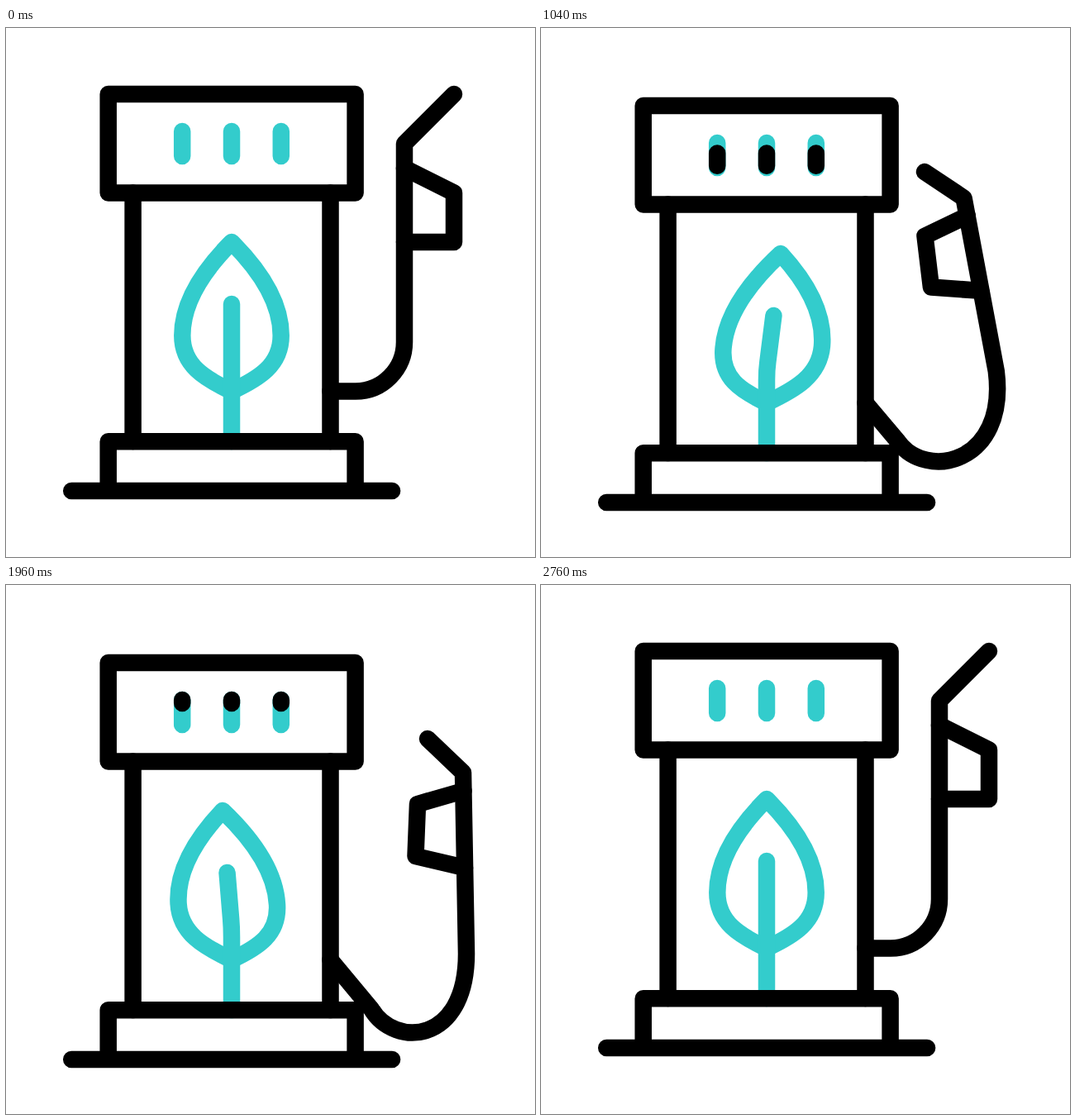
These frames come from a looping animation (640x640 px, 3 s). An HTML page:

```html
<!DOCTYPE html>
<html lang="en">
<head>
<meta charset="utf-8">
<title>Green fuel pump</title>
<style>
  html, body { margin: 0; width: 100%; height: 100%; overflow: hidden; background: #fff; }
  svg { display: block; width: 100vw; height: 100vh; }
  path { fill: none; stroke-width: 20.5; stroke-linecap: round; stroke-linejoin: round; }
  .teal { stroke: #33cccc; }
  .black { stroke: #000; }
</style>
</head>
<body>
<svg viewBox="0 0 640 640">
  <g id="pump">
    <path id="leaf" class="teal"/>
    <path id="stem" class="teal"/>
    <path id="slots" class="teal"/>
    <path id="lamps" class="black"/>
    <path class="black" d="M123.7 79.9H422.6V199.5H123.7Z"/>
    <path class="black" d="M153.6 199.5V500M392.5 199.5V500"/>
    <path class="black" d="M123.7 560V500.2H422.6V560M79.2 560H467.1"/>
    <path id="hose" class="black"/>
    <path id="grip" class="black"/>
  </g>
</svg>
<script>
const LOOP = 3000, STEP = 40;
const MID = 273, SLOT_GAP = 59.8, SLOT_END = 155, SLOT_LEN = 30;

const fix = v => v.toFixed(2);
const mix = (a, b, u) => a + (b - a) * u;
const setPath = (id, d) => document.getElementById(id).setAttribute("d", d);

// Smooth 0..1 ramp between two times
function ramp(t, from, to) {
  const u = Math.min(1, Math.max(0, (t - from) / (to - from)));
  return u * u * (3 - 2 * u);
}

// The pump sinks, settles a little higher, then rises again
const drop = t =>
  16.5 * ramp(t, 120, 600) - 2.5 * ramp(t, 600, 880) - 14 * ramp(t, 2100, 2640);

// Poses relative to the pump; bend is one cubic, grip runs from neck to neck
const rest = {
  bend: [[423, 439.5], [456, 439.5], [482, 412], [482, 380]],
  neck: [[482, 140], [542, 80]],
  grip: [[482, 169.5], [542, 199.5], [542, 259], [482, 259]]
};
const docked = {
  bend: [[424, 476.5], [462, 524.5], [571, 492.5], [546, 377.5]],
  neck: [[480, 175.5], [429, 151]],
  grip: [[487, 196.5], [439, 227.5], [454, 288.5], [515, 285.5]]
};
const hanging = {
  bend: [[442, 499], [470, 546], [557, 542], [557, 432]],
  neck: [[553, 213], [510, 172]],
  grip: [[553.5, 235], [498, 251], [495.5, 314], [555, 328]]
};

function drawHose(t) {
  const out = ramp(t, 140, 500), off = ramp(t, 740, 1400), home = ramp(t, 2070, 2740);
  const blend = part => rest[part].map((p, i) => p.map((v, k) => {
    const away = mix(docked[part][i][k], hanging[part][i][k], off);
    return mix(v, away, out - home);
  }));
  const text = p => p.map(fix).join(" ");
  const [start, c1, c2, end] = blend("bend").map(text);
  const [neck, tip] = blend("neck");
  // the tip looks shorter while the nozzle turns over
  const turn = out - home, fold = turn * (1 - turn);
  const shortTip = tip.map((v, k) => mix(v, neck[k], fold));
  setPath("hose", `M392.5 439.5L${start}C${c1} ${c2} ${end}L${text(neck)}L${text(shortTip)}`);
  setPath("grip", "M" + blend("grip").map(text).join("L"));
}

function drawLeaf(t) {
  const sway = 18 * (ramp(t, 500, 960) - 2 * ramp(t, 960, 1720) + ramp(t, 1720, 2280));
  // side: -1 left, 1 right; bend: share of the sway; the far side tilts slightly
  const pt = (side, dx, y, bend) =>
    fix(MID + side * dx + sway * bend) + " " + fix(y - side * sway * dx * .001);
  const half = side =>
    `M${pt(side, 0, 259, 1)}C${pt(side, 37, 296, .79)} ${pt(side, 59.7, 333, .62)} ${pt(side, 59.7, 372, .43)}` +
    `C${pt(side, 59.7, 408, .24)} ${pt(side, 33, 424, .06)} ${pt(side, 0, 439.5, 0)}`;
  setPath("leaf", half(-1) + half(1));
  setPath("stem", `M${MID} 500V412Q${MID} 400 ${fix(MID + sway * .08)} 390L${fix(MID + sway * .5)} 334`);
}

// Three upright strokes; 0 is the lower end of a slot, 1 the upper
function strokes(from, to) {
  const y = u => fix(SLOT_END - SLOT_LEN * u);
  return [-1, 0, 1].map(i => `M${MID + i * SLOT_GAP} ${y(from)}V${y(to)}`).join("");
}

function drawLamps(t) {
  const head = ramp(t, 260, 1660), tail = ramp(t, 790, 2310);
  setPath("lamps", head > tail ? strokes(tail, head) : "");
}

function draw(now) {
  const t = Math.floor(now % LOOP / STEP) * STEP;
  document.getElementById("pump").setAttribute("transform", `translate(0 ${fix(drop(t))})`);
  drawLeaf(t);
  drawLamps(t);
  drawHose(t);
}

let start = null;
function tick(now) {
  if (start === null) start = now;
  draw(now - start);
  requestAnimationFrame(tick);
}
setPath("slots", strokes(0, 1));
draw(0);
requestAnimationFrame(tick);
</script>
</body>
</html>
```
